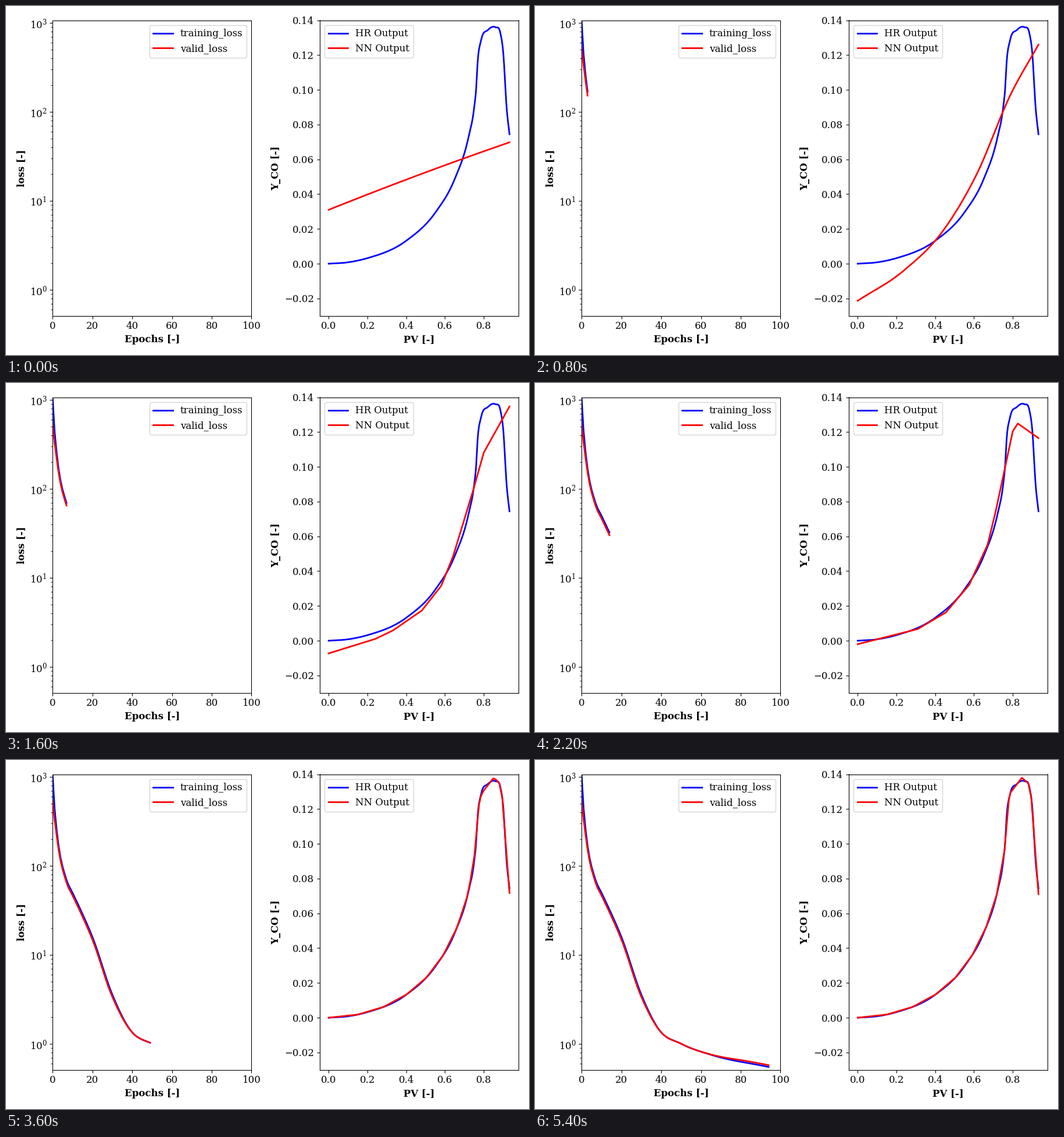
Recreate the animation shown at these times as a matplotlib script. Size 900 px wide and 600 px high, loop 5600 ms.

```python
import numpy as np
import matplotlib.pyplot as plt
from matplotlib.animation import FuncAnimation

FRAMES, INTERVAL = 28, 200
X_END = 0.9325
LOSS_RANGE = 0.512, 1070

plt.rcParams.update({
    "font.family": "DejaVu Serif",
    "font.size": 12,
    "axes.labelweight": "bold",
    "lines.linewidth": 2,
})


def smooth(x, *points):
    """Cubic Hermite curve through the given points."""
    px, py = np.array(points, float).T
    slope = np.gradient(py, px)
    i = np.clip(np.searchsorted(px, x, side="right") - 1, 0, len(px) - 2)
    h = px[i + 1] - px[i]
    t = (x - px[i]) / h
    return ((1 + 2 * t) * (1 - t) ** 2 * py[i] + t * (1 - t) ** 2 * h * slope[i]
            + t * t * (3 - 2 * t) * py[i + 1] + t * t * (t - 1) * h * slope[i + 1])


def bent(x, *points):
    return np.interp(x, *np.array(points).T)


# Losses, as log10 over epochs; validation starts low and ends slightly high
epochs = np.arange(95)
train = smooth(epochs, (0, np.log10(LOSS_RANGE[1])), (1, 2.647), (2, 2.412),
               (7, 1.843), (10, 1.699), (14, 1.510), (20, 1.203), (30, 0.556),
               (39, 0.159), (50, 0.003), (65, -0.121), (94, -0.258))
gap = bent(epochs, (28, -0.03), (40, 0), (62, 0), (80, 0.02))
valid = train + gap - 0.27 * np.exp(-epochs)

# Reference profile: slow growth, steep rise, rounded peak, steep fall
pv = np.linspace(0, X_END, 500)
profile = smooth(pv, (0, 0), (0.1, 0.0008), (0.2, 0.0032), (0.4, 0.0132),
                 (0.55, 0.0294), (0.65, 0.0487), (0.72, 0.0722),
                 (0.75, 0.0895), (0.76, 0.1), (0.768, 0.1155), (0.786, 0.1285),
                 (0.82, 0.1343), (0.86, 0.136), (0.885, 0.1328),
                 (0.9, 0.1217), (0.918, 0.0892), (X_END, 0.0744))


def chord_fit(shoulder, peak, end):
    """Straight pieces along the profile, with a pointed peak."""
    t = np.linspace(0, 1, 11)
    rise = shoulder * (1 - (1 - t) ** 2)
    knots = np.concatenate([rise, [peak, 0.88, 0.895, X_END]])
    heights = np.interp(knots, pv, profile)
    heights[-4], heights[-1] = 0.138, end
    return np.interp(pv, knots, heights)


# Network output after certain epochs (-1: untrained)
stages = {
    -1: 0.031 + 0.0447 * pv - 0.0033 * pv ** 2,
    3: smooth(pv, (0, -0.0213), (0.235, -0.0042), (0.44, 0.0189),
              (0.613, 0.0513), (0.79, 0.0976), (X_END, 0.126)),
    7: bent(pv, (0, -0.0073), (0.24, 0.001), (0.33, 0.0058), (0.48, 0.0173),
            (0.58, 0.0315), (0.64, 0.048), (0.74, 0.0845), (0.8, 0.1082),
            (X_END, 0.1347)),
    14: bent(pv, (0, -0.002), (0.31, 0.0067), (0.455, 0.0163), (0.575, 0.0321),
             (0.67, 0.0552), (0.71, 0.0735), (0.8, 0.1205), (0.826, 0.1249),
             (X_END, 0.1165)),
    34: chord_fit(0.8, 0.864, 0.0755),
    69: chord_fit(0.783, 0.849, 0.0703),
    94: chord_fit(0.788, 0.847, 0.071),
}
stage_epochs = list(stages)


def error(epoch):
    return 30.0 if epoch < 0 else 10 ** (valid[epoch] / 2)


def epoch_at(n):
    """One epoch per step at first, then five."""
    return n - 1 if n <= 10 else 5 * n - 41


def output_at(epoch):
    """Blend neighbouring stages as the validation error falls."""
    k = np.searchsorted(stage_epochs[1:-1], epoch, side="right")
    a, b = stage_epochs[k:k + 2]
    w = (error(a) - error(epoch)) / (error(a) - error(b))
    return (1 - w) * stages[a] + w * stages[b]


fig, (ax_loss, ax_fit) = plt.subplots(1, 2, figsize=(9, 6), dpi=100)

train_line, = ax_loss.plot([], [], "b", label="training_loss")
valid_line, = ax_loss.plot([], [], "r", label="valid_loss")
ax_loss.set(yscale="log", xlim=(0, 100), ylim=LOSS_RANGE,
            xlabel="Epochs [-]", ylabel="loss [-]")
ax_loss.legend(loc="upper right")

ax_fit.plot(pv, profile, "b", label="HR Output")
fit_line, = ax_fit.plot(pv, stages[-1], "r", label="NN Output")
ax_fit.set(xlim=(-0.05 * X_END, 1.05 * X_END), ylim=(-0.03, 0.14),
           xlabel="PV [-]", ylabel="Y_CO [-]")
ax_fit.legend(loc="upper left")

fig.tight_layout()


def draw(n):
    epoch = epoch_at(n)
    done = slice(0, epoch + 1)
    train_line.set_data(epochs[done], 10 ** train[done])
    valid_line.set_data(epochs[done], 10 ** valid[done])
    fit_line.set_ydata(output_at(epoch))
    return train_line, valid_line, fit_line


anim = FuncAnimation(fig, draw, frames=FRAMES, interval=INTERVAL,
                     repeat=True, repeat_delay=0)
plt.show()
```
